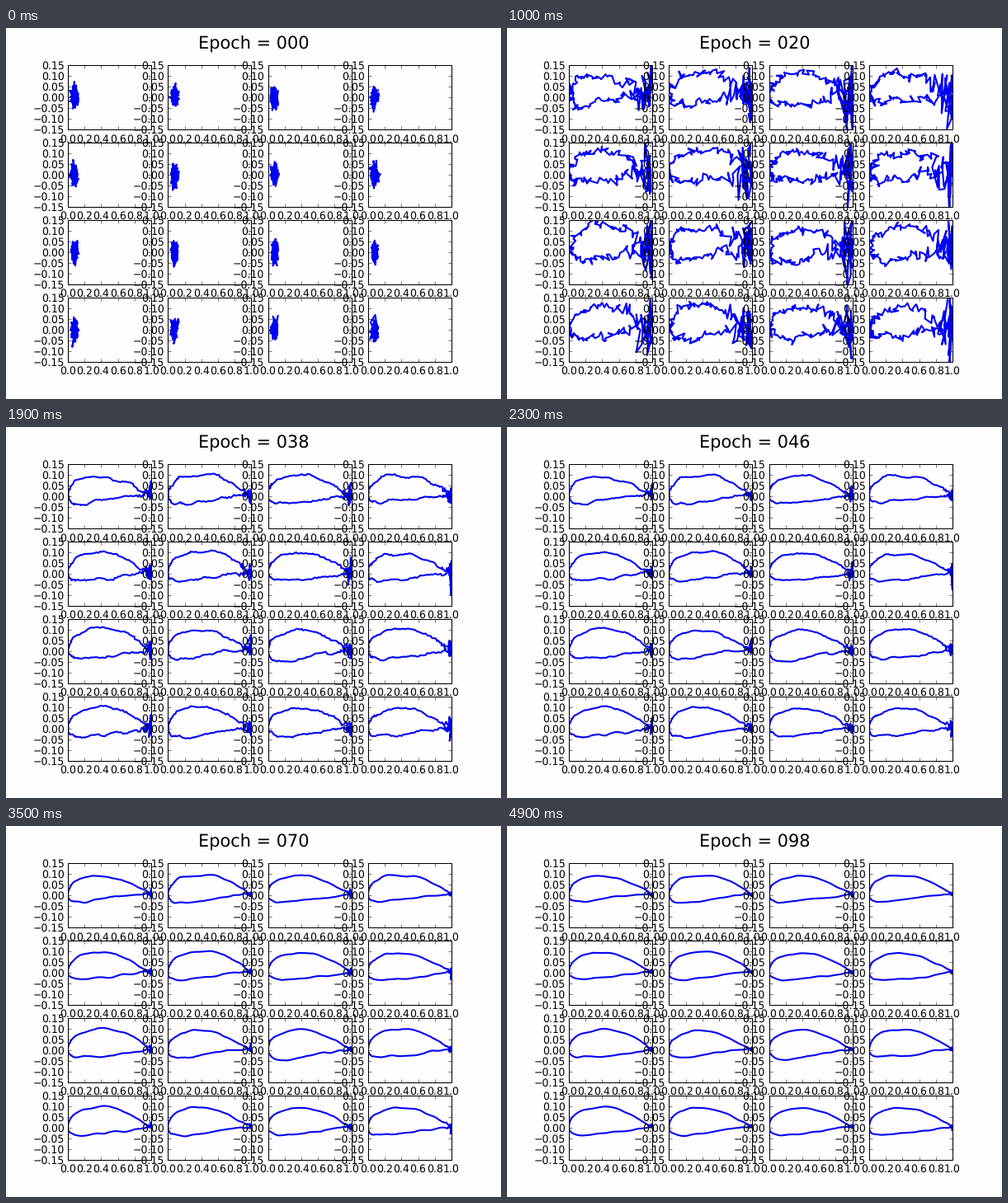
Recreate the animation shown at these times as a matplotlib script. Size 600x450 px, loop 5 s.

```python
import numpy as np
import matplotlib.pyplot as plt
from matplotlib.animation import FuncAnimation
from matplotlib.collections import LineCollection
from matplotlib.patches import Rectangle

plt.rcParams.update({"font.family": "DejaVu Sans", "font.size": 12,
                     "text.hinting": "none", "savefig.dpi": "figure"})

WIDTH, HEIGHT, DPI = 600, 450, 75
FRAMES, INTERVAL, EPOCHS_PER_FRAME = 50, 100, 2
PAPER, BLUE = "#fefdff", "#0000f4"
ROWS = COLS = 4
FOILS = ROWS * COLS
POINTS = 140
PANEL_W, PANEL_H = 465 / 4.6, 360 / 4.6
PT = DPI / 72
PEAK = 12  # epoch at which the outlines are most scattered

rng = np.random.default_rng(4)
angle = np.linspace(0, 2 * np.pi, POINTS)
chord = (1 + np.cos(angle)) / 2  # tail, over the nose, back to the tail


def surface(heights):
    """Round-nosed curve through heights at a few chord stations."""
    stations = np.array([.1, .3, .5, .7, .85, 1])
    fit = np.polyfit(stations, heights / np.sqrt(stations), 4)
    return np.sqrt(chord) * np.polyval(fit, chord)


def smooth_noise():
    kernel = np.exp(-np.linspace(-3, 3, 15) ** 2 / 2)
    kernel /= np.sqrt((kernel ** 2).sum())
    return np.array([np.convolve(row, kernel, "same")
                     for row in rng.normal(size=(FOILS, POINTS))])


def varied(base):
    """One copy of the surface per foil, each with its own slight bend."""
    bends = np.array([np.sin(k * np.pi * chord) / k for k in (1, 2, 3)])
    return base + .004 * rng.normal(size=(FOILS, 3)) @ bends


upper = varied(surface([.068, .091, .088, .066, .036, .004]))
lower = varied(surface([-.032, -.030, -.021, -.008, -.001, .004]))
foils = np.where(angle < np.pi, upper, lower)
noise_x, noise_y = rng.normal(size=(2, 2, FOILS, POINTS))
waves = smooth_noise(), smooth_noise()


def mix(a, b, amount):
    return a + (b - a) * amount


def outlines(epoch):
    """Start as a small blob, scatter until PEAK, then settle by power laws."""
    start = min(epoch / PEAK, 1)
    rise = start * start * (3 - 2 * start)
    fade = PEAK / max(epoch, PEAK)
    near_tail = chord ** max(1.3, .65 * (epoch - 10))
    spread_x = mix(.08 * fade ** 2.6, .06 * fade, near_tail)
    spread_y = mix(.035 * fade ** 2.6, .18 * fade ** 1.6, near_tail)

    def drift(pair):
        return pair[0] * np.cos(epoch / 40) + pair[1] * np.sin(epoch / 40)

    goal_x = chord + (.1 - .15 * chord) * fade ** 4
    goal_y = (foils * (1 + .3 * (fade - PEAK / 98)) + .03 * fade ** 4
              + .014 * fade * drift(waves))
    x = mix(.08, goal_x, rise) + mix(.02, spread_x, rise) * drift(noise_x)
    y = goal_y * rise + mix(.023, spread_y, rise) * drift(noise_y)
    return np.abs(1 - np.abs(1 - x)), y


fig = plt.figure(figsize=(WIDTH / DPI, HEIGHT / DPI), dpi=DPI, facecolor=PAPER)
ax = fig.add_axes([0, 0, 1, 1])
ax.set(xlim=(0, WIDTH), ylim=(HEIGHT, 0))
ax.axis("off")
title = fig.suptitle("", fontsize=20, y=.978)

corners = [(75 + col * 1.2 * PANEL_W, 45 + row * 1.2 * PANEL_H)
           for row in range(ROWS) for col in range(COLS)]
lines, ticks = [], []
for left, top in corners:
    right, bottom = left + PANEL_W, top + PANEL_H
    frame = ax.add_patch(Rectangle((left, top), PANEL_W, PANEL_H, fill=False,
                                   ec="black", lw=1, zorder=3))
    line, = ax.plot([], [], color=BLUE, lw=2, solid_joinstyle="round",
                    solid_capstyle="butt", zorder=2)
    line.set_clip_path(frame)
    lines.append(line)
    size = 4 * PT
    for k in range(6):
        x = left + PANEL_W * k / 5
        ticks += [[(x, top), (x, top + size)], [(x, bottom), (x, bottom - size)]]
        ax.text(x, bottom + 5 * PT, f"{k / 5:.1f}", ha="center", va="top", zorder=4)
    for k in range(-3, 4):
        y = top + PANEL_H * (3 - k) / 6
        ticks += [[(left, y), (left + size, y)], [(right, y), (right - size, y)]]
        label = f"{k * .05:.2f}".replace("-", "\u2212")
        ax.text(left - size, y, label, ha="right", va="center_baseline", zorder=4)
ax.add_collection(LineCollection(ticks, colors="black", linewidths=.5, zorder=3),
                  autolim=False)


def update(i):
    epoch = i * EPOCHS_PER_FRAME
    title.set_text(f"Epoch = {epoch:03d}")
    for line, (left, top), x, y in zip(lines, corners, *outlines(epoch)):
        line.set_data(left + PANEL_W * x, top + PANEL_H * (.15 - y) / .3)
    return [title, *lines]


anim = FuncAnimation(fig, update, frames=FRAMES, interval=INTERVAL,
                     repeat=True, repeat_delay=0, blit=False)
plt.show()
```
